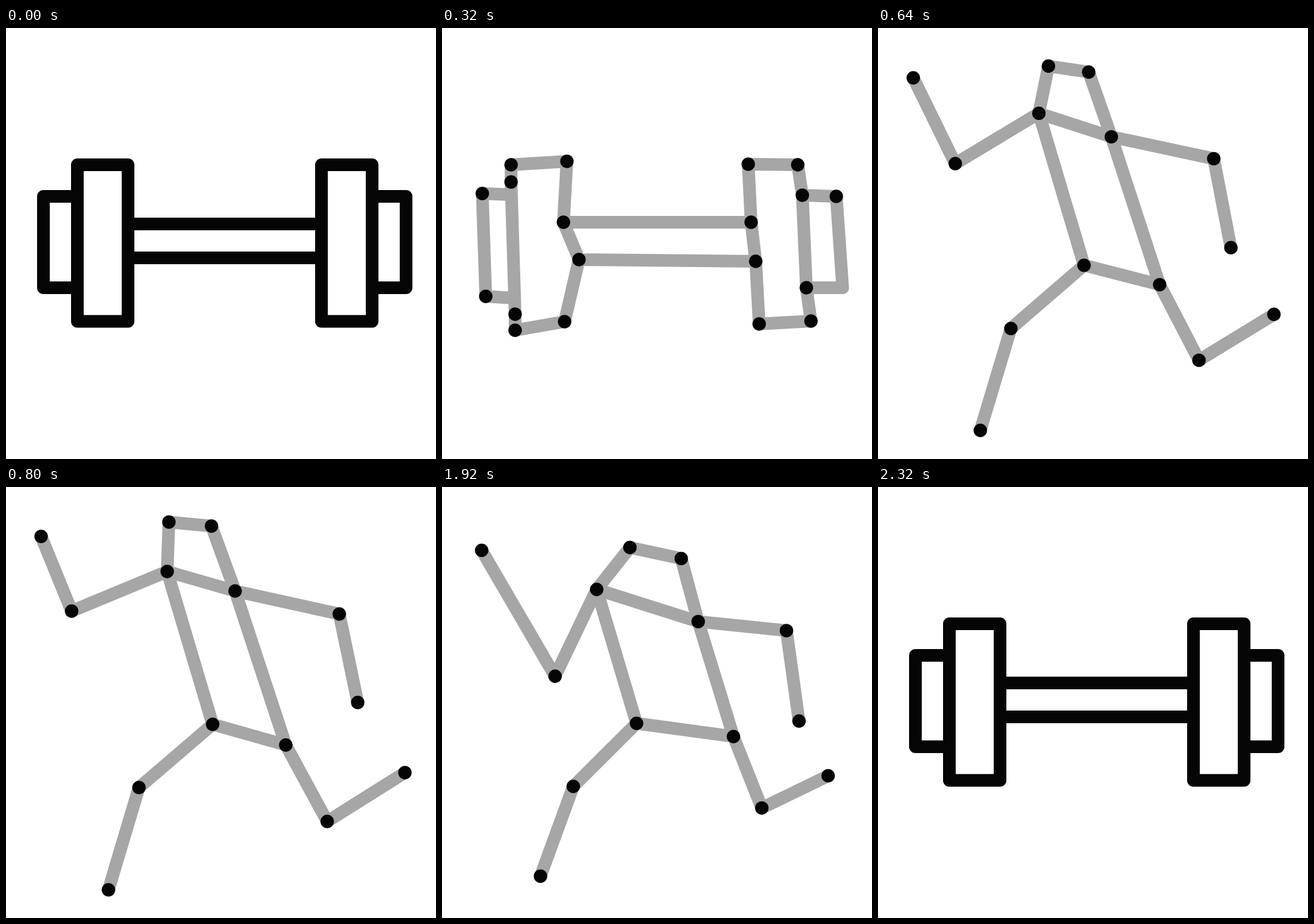
Recreate the animation shown at these times as an HTML page with a canvas. Size 747x750 px, loop 2720 ms.

```html
<!DOCTYPE html>
<html lang="en">
<head>
<meta charset="utf-8">
<title>Dumbbell to runner</title>
<style>
html, body { margin: 0; width: 100%; height: 100%; overflow: hidden; background: #fff; }
canvas { display: block; }
</style>
</head>
<body>
<canvas id="stage" width="747" height="750"></canvas>
<script>
const ctx = document.getElementById('stage').getContext('2d');
const LOOP = 2720, TICK = 80;
const BLACK = 5, GREY = 166;
const BEND = 4, RUN = 10;   // steps where the joints start and stop moving

// Each joint: place in the bent dumbbell, place in the runner, optional swing on the way
const joints = {
  handL: [[120, 268], [61, 86]],
  elbowL: [[127, 498], [114, 216], [86, 80]],
  shoulderL: [[211, 338], [280, 147]],
  headL: [[217, 232], [283, 61], [58, 17]],
  headR: [[532, 237], [357, 68]],
  shoulderR: [[537, 338], [398, 181]],
  elbowR: [[626, 291], [579, 221]],
  handR: [[633, 452], [611, 375]],
  hipL: [[238, 403], [359, 413]],
  kneeL: [[213, 511], [231, 523]],
  footL: [[127, 526], [178, 701]],
  hipR: [[545, 406], [486, 449]],
  kneeR: [[551, 515], [558, 582]],
  footR: [[641, 510], [693, 497]],
};

// Spare corners of the weights and the joint each one folds into
const corners = {
  topL: [[120, 238], 'handL'],
  capA: [[70, 288], 'handL'],
  capB: [[76, 467], 'elbowL'],
  topR: [[618, 238], 'elbowR'],
  capC: [[685, 293], 'elbowR'],
  capD: [[696, 452], 'handR'],
  joinA: [[120, 290], 'handL'],
  joinB: [[126, 470], 'elbowL'],
};
const undotted = ['capD', 'joinA', 'joinB'];

const chains = list => list.map(s => s.split(' '));
const body = chains([
  'handL elbowL shoulderL headL headR shoulderR elbowR handR',
  'footL kneeL hipL hipR kneeR footR',
  'hipL shoulderL shoulderR hipR']);
const plates = chains([
  'footL elbowL handL topL headL shoulderL hipL kneeL footL',
  'topR headR shoulderR hipR kneeR footR handR elbowR topR',
  'shoulderL shoulderR', 'hipL hipR']);
const caps = chains([
  'topL handL', 'joinA capA capB joinB', 'topR elbowR capC capD handR']);

const lerp = (a, b, k) => a + (b - a) * k;

function lines(list, shade) {
  ctx.strokeStyle = `rgb(${shade},${shade},${shade})`;
  ctx.lineWidth = 22;
  ctx.lineCap = ctx.lineJoin = 'round';
  ctx.beginPath();
  for (const line of list) line.forEach(([x, y], i) => i ? ctx.lineTo(x, y) : ctx.moveTo(x, y));
  ctx.stroke();
}

function dots(points, r) {
  ctx.fillStyle = `rgb(${BLACK},${BLACK},${BLACK})`;
  for (const [x, y] of points) {
    ctx.beginPath();
    ctx.arc(x, y, r, 0, Math.PI * 2);
    ctx.fill();
  }
}

function drawDumbbell(fade) {
  const mirror = line => line.map(([x, y]) => [760 - x, y]);
  const plate = [[124, 238], [212, 238], [212, 510.5], [124, 510.5], [124, 238]];
  const cap = [[124, 293], [65, 293], [65, 452], [124, 452]];
  const bars = [341, 400].map(y => [[212, y], [548, y]]);
  const parts = [plate, cap, mirror(plate), mirror(cap), ...bars];
  lines(parts, Math.round(lerp(BLACK, GREY, fade)));
  if (fade) dots(parts.flat(), 11);
}

// Ease out; joints further left settle sooner
const ease = (u, x) => 1 - (1 - u) ** (3.7 - 0.0055 * (x - 350));

function place([from, to, swing = [0, 0]], u) {
  const k = ease(u, from[0]);
  const arc = 9.5 * u * (1 - u) ** 3;
  return from.map((v, i) => lerp(v, to[i], k) + swing[i] * arc);
}

function drawBody(step) {
  const u = (step - BEND) / (RUN - BEND);
  const at = {};
  for (const name in joints) at[name] = place(joints[name], u);

  let shown = body;
  if (step <= BEND + 1) {
    for (const name in corners) {
      const [from, joint] = corners[name];
      const rest = 1 - ease(u, from[0]);
      at[name] = at[joint].map((v, i) => v + (from[i] - joints[joint][0][i]) * rest);
    }
    shown = [...(step === BEND ? plates : body), ...caps];
  }
  lines(shown.map(chain => chain.map(name => at[name])), GREY);
  dots(Object.keys(at).filter(name => !undotted.includes(name)).map(name => at[name]), 11.7);
}

// Morph in ten steps, hold, then the same steps backwards
function stepAt(ms) {
  const n = Math.floor((ms % LOOP) / TICK);
  if (n < 21) return Math.min(n, RUN);
  return n < 29 ? 30 - n : 0;
}

function draw() {
  const step = stepAt(performance.now());
  ctx.fillStyle = '#fff';
  ctx.fillRect(0, 0, 747, 750);
  if (step < BEND) drawDumbbell([0, 0.2, 0.55, 1][step]);
  else drawBody(step);
  requestAnimationFrame(draw);
}
draw();
</script>
</body>
</html>
```
